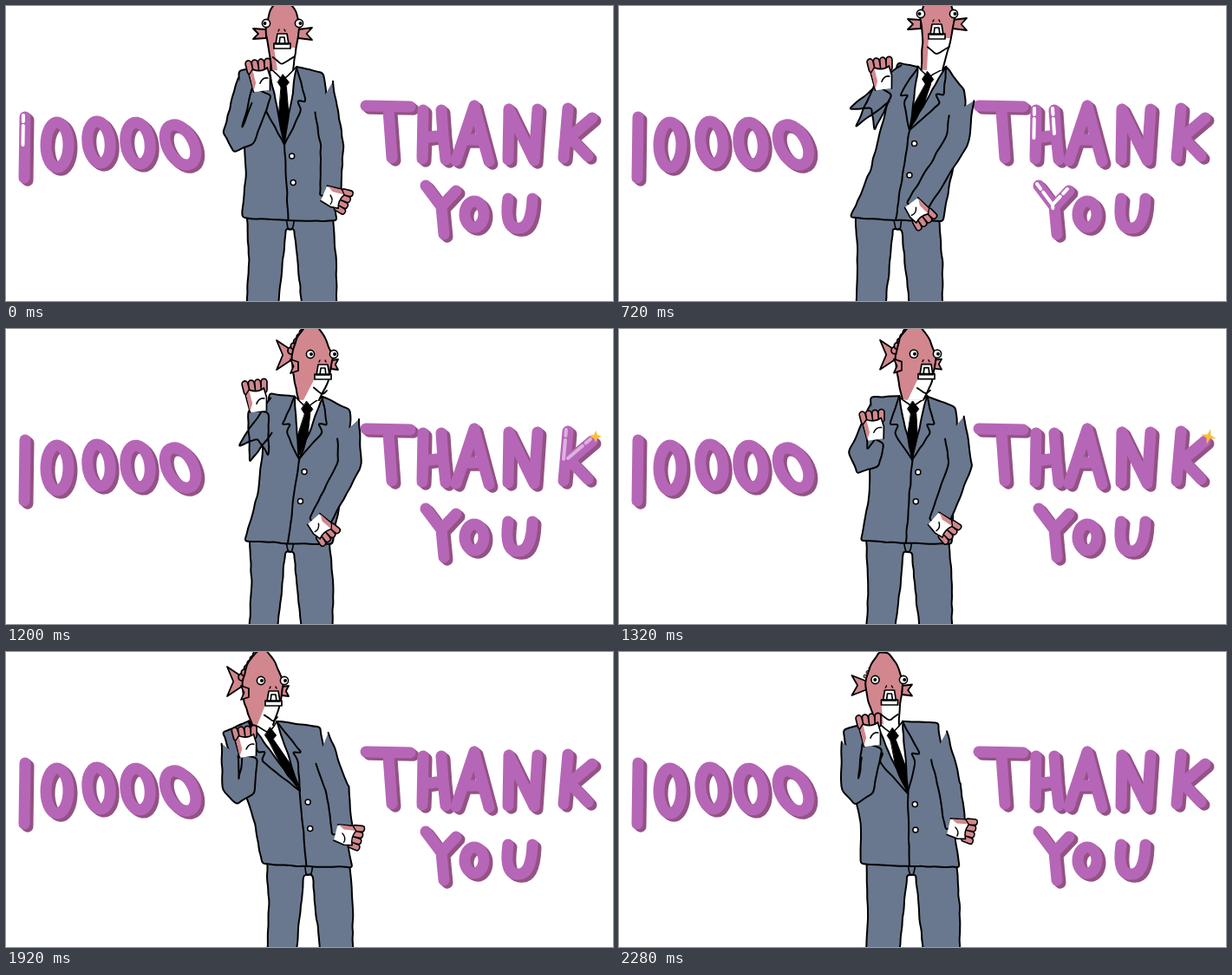
Recreate the animation shown at these times as an HTML page with a canvas. Size 700x340 px, loop 2.4 s.

```html
<!DOCTYPE html>
<html lang="en">
<head>
<meta charset="utf-8">
<title>10000 thank you</title>
<style>
html, body { margin: 0; width: 100%; height: 100%; overflow: hidden; background: #fff; }
canvas { display: block; }
</style>
</head>
<body>
<canvas id="stage" width="700" height="340"></canvas>
<script>
const ctx = document.getElementById('stage').getContext('2d');
const STEP = 120, STEPS = 20;
const SUIT = '#69788e', SKIN = '#d1878d', WHITE = '#fff', INK = '#000';
const PURPLE = '#b666b7', SHADE = '#945285';

// Steps of the seven key poses; the last one wraps to the first.
const keys = [0, 3, 6, 10, 13, 16, 19, 20];

// The rig: one joint position per key pose. Everything else is built on it.
const rig = {
  head: '319,20 349,13 367,9 353,29 320,28 296,33 306,32',
  neck: '319,70 344,65 361,70 349,78 319,77 296,80 311,80',
  chest: '321,160 324,154 335,143 338,150 338,152 339,160 333,163',
  shoulderL: '268,74 288,59 322,65 304,74 262,88 250,92 258,90',
  elbowL: '269,150 281,128 279,132 284,144 280,158 268,157 275,157',
  wristL: '295,98 279,184 305,96 291,95 305,190 279,120 292,108',
  shoulderR: '376,79 396,90 408,98 406,95 380,86 372,88 378,84',
  elbowR: '376,160 376,155 390,155 396,155 388,158 382,158 381,155',
  wristR: '374,219 354,231 342,233 360,225 386,221 388,210 388,203',
  hem: '272,381 265,371 267,373 275,377 288,398 295,400 279,393', // left and right x
  turn: '0 0 0 1 1 1 .5'
};
for (const name in rig) rig[name] = rig[name].split(' ').map(p => p.split(',').map(Number));

const mix = (a, b, t) => a + (b - a) * t;
const lerp = (p, q, t) => p.map((v, i) => mix(v, q[i], t));
const add = ([x, y], dx, dy) => [x + dx, y + dy];

function poseAt(step) {
  const k = keys.findLastIndex(v => v <= step);
  const t = (step - keys[k]) / (keys[k + 1] - keys[k]);
  return Object.fromEntries(Object.entries(rig).map(([name, p]) => [name, lerp(p[k], p[(k + 1) % 7], t)]));
}

// Seeded wobble for hand-drawn lines
let seed = 0;
const wobble = () => {
  const v = Math.sin(++seed * 127.1) * 43758.5;
  return (v - Math.floor(v)) * 1.4 - .7;
};

function paint(fill, line, path) {
  if (fill) { ctx.fillStyle = fill; ctx.fill(path); }
  if (line) { ctx.strokeStyle = INK; ctx.lineWidth = line; ctx.stroke(path); }
}

function sketch(points, fill, line = 2) {
  const p = [];
  points.slice(1).forEach((next, i) => {
    const n = Math.ceil(Math.hypot(next[0] - points[i][0], next[1] - points[i][1]) / 8);
    for (let j = 0; j < n; j++) p.push(add(lerp(points[i], next, j / n), wobble(), wobble()));
  });
  p.push(points.at(-1));
  const path = new Path2D();
  path.moveTo(...p[0]);
  for (let i = 1; i < p.length - 1; i++) path.quadraticCurveTo(...p[i], ...lerp(p[i], p[i + 1], .5));
  path.lineTo(...p.at(-1));
  paint(fill, line, path);
}

const poly = (points, fill, line = 1.8) => paint(fill, line, new Path2D('M' + points.join('L') + 'Z'));

function dot([x, y], r, fill, line) {
  const path = new Path2D();
  path.arc(x, y, r, 0, 7);
  paint(fill, line, path);
}

// Unit vector pointing to one side of the way from p to q
function normal(p, q, side) {
  const dx = q[0] - p[0], dy = q[1] - p[1], d = side * Math.hypot(dx, dy);
  return [-dy / d, dx / d];
}

// A sleeve along shoulder, elbow and wrist; a folded elbow is wider.
function drawSleeve(a, b, c, side) {
  const n = normal(a, b, side), m = normal(b, c, side);
  const fold = (1 - n[0] * m[0] - n[1] * m[1]) / 2;
  const size = Math.hypot(n[0] + m[0], n[1] + m[1]) || 1;
  const mid = [(n[0] + m[0]) / size, (n[1] + m[1]) / size];
  const w = 13 + 6 * fold;
  const off = (p, v, r) => add(p, v[0] * r, v[1] * r);
  const inner = off(b, mid, -w * (1 - fold * .5));
  sketch([off(a, n, 13), off(b, n, w), off(b, mid, w), off(b, m, w), off(c, m, 12), off(c, m, -12),
    inner, lerp(inner, off(a, n, -13), .55)], SUIT);
}

function drawHand([x, y], angle, height, shift = 0) {
  ctx.save();
  ctx.translate(x, y);
  ctx.rotate(angle);
  ctx.translate(0, shift);
  ctx.scale(.95, height);
  for (const [color, width] of [[INK, 9], [SKIN, 5.5]]) {
    ctx.strokeStyle = color;
    ctx.lineWidth = width;
    for (let x = -11; x < 12; x += 7) ctx.stroke(new Path2D(`M${x} -24l${x / 9} -9`));
  }
  paint(WHITE, 1.8, new Path2D('M-10 0L-13-20-8-26Q2-21 10-26L12-15 10 0'));
  paint(SKIN, 0, new Path2D('M-10-1L-12-20-8-25-6-10Z'));
  paint(null, 1.6, new Path2D('M-1-9Q3-16 9-14'));
  ctx.restore();
}

function drawFin([x, y], length, spread) {
  poly([[x, y - 5], [x + length, y - spread], [x + length * .6, y], [x + length, y + spread], [x, y + 5]], SKIN);
}

function drawHead({ head, neck, turn: [turn] }) {
  const at = (dx, dy) => add(head, dx, dy);
  const half = 20 + 4 * turn, top = -28 - 7 * turn;
  const mouth = at(13 * turn - 1, 25), cheek = at(16 + 3 * turn, 28 + 4 * turn);
  const neckL = add(neck, -12, 4), neckR = add(neck, 12, 4);
  drawFin(at(1 - half, 12 - 11 * turn), -15 - 3 * turn, 6 + 11 * turn);
  drawFin(at(half - 2, 12), 16 - 8 * turn, 7 - turn);
  for (let i = 0; i < 6; i++) // back fin, hidden in front view
    dot(lerp(at(-half, -4), at(-4, top), i / 6), 4 * turn, SKIN, 1.8 * turn + .01);
  const outline = [neckL, at(-17 - 4 * turn, 26), at(-half, 4), at(-14 - 4 * turn, top * .55), at(-6, top), at(4, top),
    at(14, top * .6), at(half, 2), cheek, neckR];
  sketch(outline, SKIN, 0);
  poly([add(mouth, -9, 3), add(mouth, 9, 3), cheek, neckR, add(neckL, 6, 0)], WHITE, 0);
  sketch(outline);
  sketch([add(mouth, -10, 14), add(mouth, 0, 22), add(cheek, -2, 10)], null, 1.8);
  if (turn > .6) drawFin(at(-16, 14), -9, 8);

  for (const side of [-1, 1]) {
    const eye = at(11.5 * turn + side * (19 - 5.5 * turn), 0);
    dot(eye, 4.6, WHITE, 1.6);
    dot(add(eye, side * 1.5 * (1 - turn) + turn, 0), 2, INK);
    poly([add(mouth, side * 3, -18), add(mouth, side * 4, -16)], null, 1.4);
  }
  const [x, y] = mouth;
  paint(WHITE, 1.7, new Path2D(`M${x - 7} ${y - 1}l2-12h11l2 12zm4 0l1-8h5l1 8zM${x - 9} ${y - 2}h19v6h-19z`));
}

function drawTie(neck, chest) {
  const knot = lerp(neck, chest, .2), wide = lerp(neck, chest, .65), tip = lerp(neck, chest, .93);
  poly([add(knot, -2, 5), add(knot, 4, 5), add(wide, 6, 0), tip, add(wide, -6, 0)], INK, 1);
  poly([add(knot, 0, -9), add(knot, 7, 0), add(knot, 0, 9), add(knot, -6, 0)], INK, 1);
}

function drawTrousers(left, right) {
  const mid = (left + right) / 2 + 1;
  sketch([[left + 6, 243], [left + 8, 292], [left + 6, 346], [mid - 14, 346], [mid - 9, 300], [mid - 5, 257],
    [mid + 5, 257], [mid + 9, 300], [mid + 14, 346], [right, 346], [right, 295], [right - 4, 243]], SUIT);
  sketch([[mid - 4, 245], [mid - 2, 257], [mid + 3, 257], [mid + 5, 245]], null, 1.6);
}

function drawJacket({ neck, chest, shoulderL, shoulderR, hem: [left, right] }) {
  const hemL = [left, 244], hemM = [mix(left, right, .49), 247], hemR = [right, 248];
  const collarL = add(neck, -16, 0), collarR = add(neck, 16, 0);
  sketch([collarL, shoulderL, add(lerp(shoulderL, hemL, .7), 6, 0), hemL, hemM, hemR,
    add(shoulderR, -8, 12), add(shoulderR, -10, -2), collarR], SUIT);
  poly([collarL, collarR, chest], WHITE, 0);
  drawTie(neck, chest);
  const knot = lerp(neck, chest, .17);
  sketch([collarL, knot, collarR], null, 1.6);
  for (const [collar, side] of [[collarL, -1], [collarR, 1]]) {
    const notch = add(lerp(collar, chest, .45), side * 17, 0);
    sketch([collar, notch, add(notch, -side * 10, -1), add(notch, -side * 5, 9), chest], SUIT);
    sketch([collar, chest]);
  }
  sketch([chest, hemM]);
  for (const t of [.15, .5]) dot(add(lerp(chest, hemM, t), 8, 0), 3, WHITE, 1.5);
}

function drawDancer(step) {
  const p = poseAt(step);
  seed = step * 1000;
  drawTrousers(...p.hem);
  drawJacket(p);
  drawHead(p);
  drawSleeve(add(p.shoulderR, -12, 10), p.elbowR, p.wristR, -1);
  const swing = Math.atan2(p.wristR[0] - p.elbowR[0], p.elbowR[1] - p.wristR[1]);
  drawHand(p.wristR, swing - 1.2, .85, 8);
  drawSleeve(add(p.shoulderL, 12, 12), p.elbowL, p.wristL, 1);
  const raised = Math.min(1, (190 - p.wristL[1]) / 80);
  drawHand(p.wristL, -.12, .65 + .35 * raised, 4 * (1 - raised));
}

function ring(x, y, rx, ry, turn = 0) {
  const path = new Path2D();
  path.ellipse(x, y, rx, ry, turn, 3.3, 3.3 + 2 * Math.PI);
  return path;
}

const stroke = d => new Path2D(d);
const topRow = [
  stroke('M22 128L21 198'),
  ring(59, 160, 13, 26), ring(107, 157, 13, 24, -.12), ring(152, 158, 14, 24, -.14), ring(201, 160, 15, 25, -.5),
  stroke('M415 115L466 116M441 120L445 175'),
  stroke('M481 120L480 176L481 152L504 149L507 177M502 120L504 149'),
  stroke('M540 115L557 179L550 154H528M540 115L519 178'),
  stroke('M580 119L579 177M580 119L609 178L613 119'),
  stroke('M648 118L643 175M676 129L650 151L671 173')
];
const bottomRow = [
  stroke('M484 207L502 231L505 263M519 213L502 231'), ring(540, 240, 11, 15),
  stroke('M579 222Q574 257 591 256Q606 256 607 222')
];

function drawLettering(step) {
  ctx.lineWidth = 13;
  for (let shift = 4; shift >= 0; shift -= 2) {
    ctx.save();
    ctx.translate(shift, shift * .8);
    ctx.strokeStyle = shift ? SHADE : PURPLE;
    [...topRow, ...bottomRow].forEach(l => ctx.stroke(l));
    ctx.restore();
  }
  if (step > 10) return;
  // A gleam runs along the rows, at the start of each stroke.
  ctx.save();
  ctx.translate(-2, -2);
  ctx.strokeStyle = step < 9 ? WHITE : '#ddb2df';
  ctx.lineWidth = 4;
  ctx.setLineDash([7, 5, 22, 999]);
  ctx.stroke(topRow[Math.min(step, 9)]);
  if (bottomRow[step - 6]) ctx.stroke(bottomRow[step - 6]);
  ctx.restore();
}

function drawSparkle(step) {
  if (step < 10 || step > 14) return;
  const r = 10 - 2 * Math.abs(step - 11.5);
  ctx.save();
  ctx.translate(680, 124);
  ctx.rotate((step - 10) * Math.PI / 12);
  ctx.fillStyle = '#fbbd35';
  ctx.fill(new Path2D(`M0 ${-r}L2-2 ${r} 0 2 2 0 ${r}-2 2 ${-r} 0-2-2Z`));
  ctx.restore();
}

ctx.lineCap = ctx.lineJoin = 'round';
let shown = -1;
function frame() {
  const step = Math.floor(performance.now() / STEP) % STEPS;
  if (step != shown) {
    shown = step;
    ctx.fillStyle = WHITE;
    ctx.fillRect(0, 0, 700, 340);
    drawLettering(step);
    drawSparkle(step);
    drawDancer(step);
  }
  requestAnimationFrame(frame);
}
frame();
</script>
</body>
</html>
```
